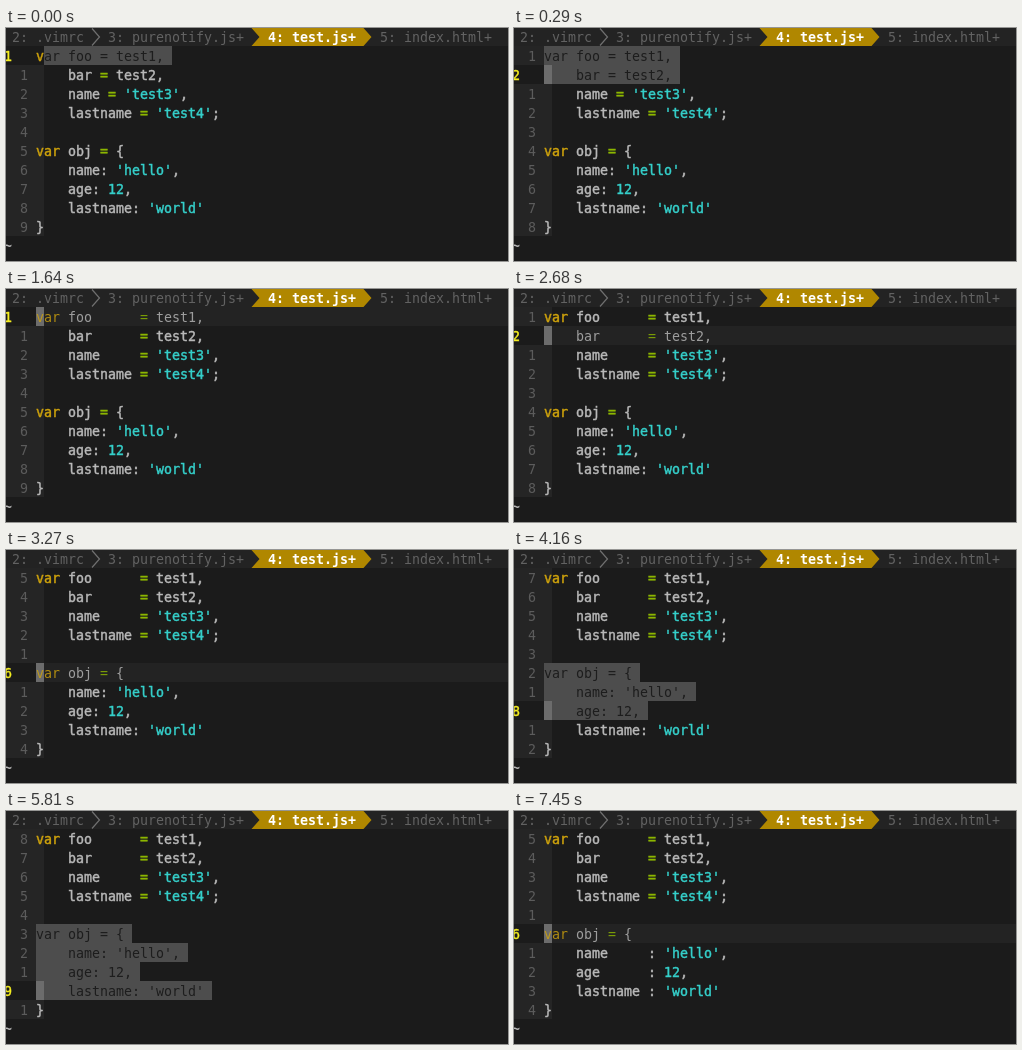
An HTML page that plays this animation: 502x233 px, repeating every 8 s.

```html
<!DOCTYPE html>
<html lang="en">
<head>
<meta charset="utf-8">
<title>Aligning code in an editor</title>
<style>
  html, body { margin: 0; width: 100%; height: 100%; overflow: hidden; background: #1b1b1b; }
  svg { display: block; }
  text { font: 13.29px "DejaVu Sans Mono", monospace; white-space: pre; fill: currentColor; color: #b8b8b8; }
  .code { stroke: currentColor; stroke-width: .45px; }
  .code .dim, .code .picked, .code .num { stroke: none; }
  .tab { color: #626262; }
  .open { color: #fff; font-weight: bold; }
  .num { color: #5c5c5c; }
  .now { color: #f5ee20; }
  .key { color: #cfa30c; }
  .op { color: #8db600; }
  .val { color: #35cfca; }
  .code text { stroke: currentColor; }
  .tilde { font-weight: bold; }
  .picked { color: #1d1d1d; }
  .dim { opacity: .82; }
  .code .dim text, .code .num, .code .picked { stroke: none; }
</style>
</head>
<body>
<svg width="502" height="233" viewBox="0 0 502 233">
  <rect width="502" height="18" fill="#232323"/>
  <path d="M245.5 0H357.5L365.5 9L357.5 18H245.5L253.5 9Z" fill="#b08700"/>
  <path d="M86 .5L93.5 9L86 17.5" fill="none" stroke="#707070" stroke-width="1.2"/>
  <text class="tab" x="6" y="14">2: .vimrc</text>
  <text class="tab" x="102" y="14">3: purenotify.js+</text>
  <text class="open" x="262" y="14">4: test.js+</text>
  <text class="tab" x="374" y="14">5: index.html+</text>
  <g id="editor" class="code"></g>
  <text class="tilde" x="-2" y="222">~</text>
</svg>
<script>
const LOOP = 8000, CELL = 8, ROW = 19, LEFT = 30, TOP = 18;
const editor = document.getElementById('editor');

// time, cursor row, first selected row (-1 for none), cursor hidden
const steps = [
  [0, 0, 0, true], [150, 0, 0], [290, 1, 0], [440, 2, 0], [590, 3, 0],
  [1640, 0, -1], [2680, 1, -1], [2830, 2, -1], [2980, 3, -1], [3120, 4, -1], [3270, 5, -1],
  [3870, 5, 5, true], [4010, 5, 5], [4160, 7, 5], [4310, 8, 5], [4760, 9, 5], [5810, 8, 5],
  [7450, 5, -1]
];

function codeLines(time) {
  const assign = (name, value) => name.padEnd(time >= 1640 ? 12 : 0) + ' = ' + value;
  const field = (name, value) =>
    '    ' + (time >= 7450 ? name.padEnd(9) : name) + ': ' + value;
  return [
    assign('var foo', 'test1,'),
    assign('    bar', 'test2,'),
    assign('    name', "'test3',"),
    assign('    lastname', "'test4';"),
    '',
    'var obj = {',
    field('name', "'hello',"),
    field('age', '12,'),
    field('lastname', "'world'"),
    '}'
  ];
}

const rect = (x, y, w, h, fill) =>
  `<rect x="${x}" y="${y}" width="${w}" height="${h}" fill="${fill}" stroke="none"/>`;
const label = (x, row, str, cls) =>
  `<text x="${x}" y="${TOP + row * ROW + 15}" class="${cls}">${str}</text>`;

function kind(token) {
  if (token === 'var') return 'key';
  if (token === '=') return 'op';
  return /^('|\d)/.test(token) ? 'val' : '';
}

function drawCode(line, row, cls) {
  let out = '';
  for (const m of line.matchAll(/'[^']*'|\w+|[^\s\w']+/g))
    out += label(LEFT + m.index * CELL, row, m[0], cls || kind(m[0]));
  return out;
}

function render([time, cursor, anchor, hidden]) {
  const visual = anchor >= 0, cursorY = TOP + cursor * ROW;
  let out = rect(0, TOP, LEFT + CELL, 10 * ROW, '#252525');
  out += rect(0, cursorY, LEFT + CELL, ROW, '#1b1b1b');
  if (!visual) out += rect(LEFT, cursorY, 502 - LEFT, ROW, '#232323');

  codeLines(time).forEach((line, row) => {
    const y = TOP + row * ROW, here = row === cursor;
    const picked = visual && row >= anchor && row <= cursor;
    out += here ? label(-2, row, row + 1, 'now') : label(14, row, Math.abs(row - cursor), 'num');
    if (picked) {
      const skip = here ? CELL : 0;
      out += rect(LEFT + skip, y, (line.length + 1) * CELL - skip, ROW, '#4d4d4d');
    }
    if (here && !hidden) out += rect(LEFT, y, CELL, ROW, '#6c6c6c');
    if (picked && here) {
      // the character under the cursor keeps its own colour
      out += label(LEFT, row, line.slice(0, 1), line[0] === 'v' ? 'key' : '');
      out += drawCode(' ' + line.slice(1), row, 'picked');
    } else {
      const code = drawCode(line, row, picked ? 'picked' : '');
      out += here ? `<g class="dim">${code}</g>` : code;
    }
  });
  editor.innerHTML = out;
}

let shown;
function tick() {
  const time = performance.now() % LOOP;
  const step = steps.findLast(s => s[0] <= time);
  if (step !== shown) render(shown = step);
  requestAnimationFrame(tick);
}
tick();
</script>
</body>
</html>
```
